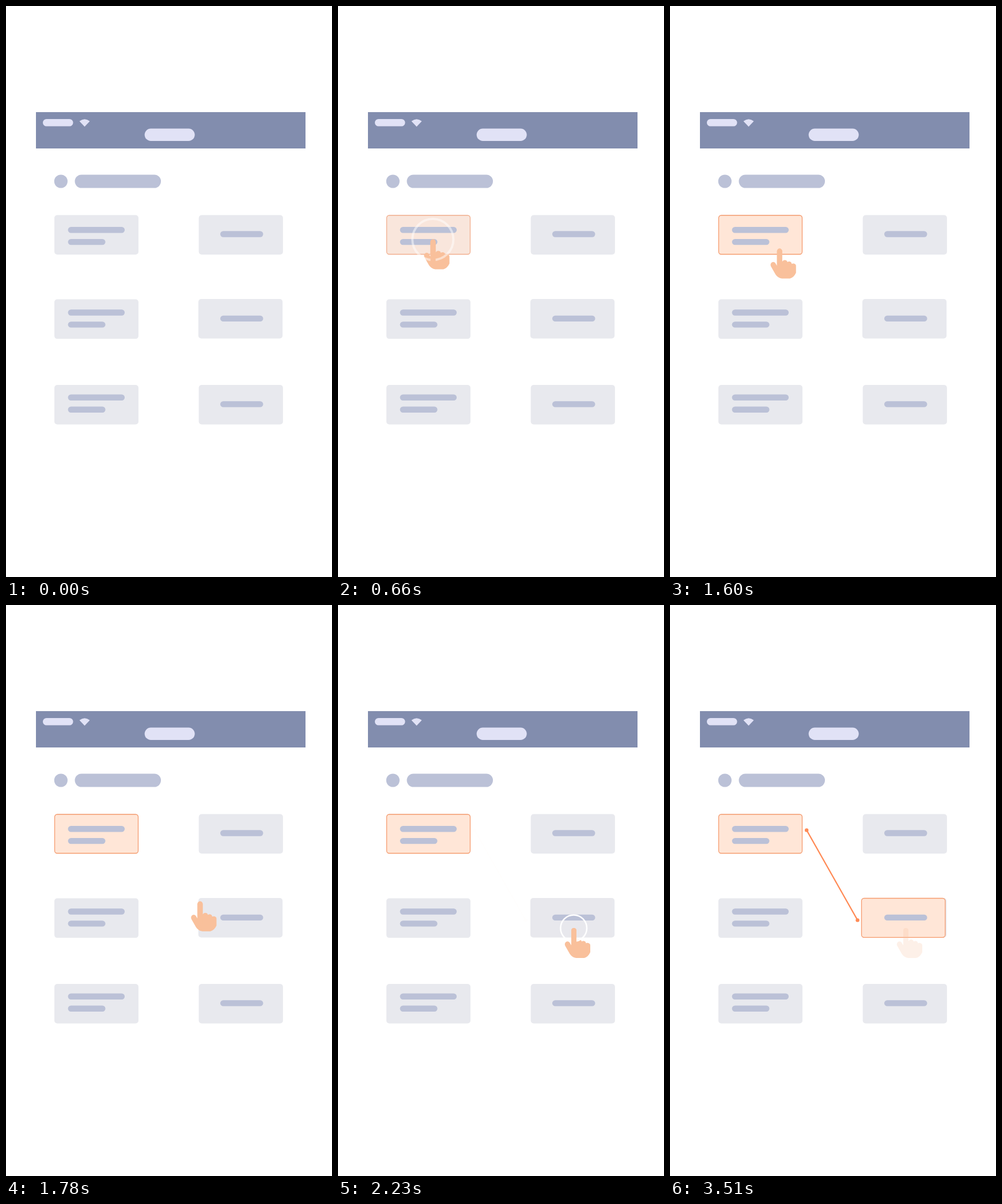
An HTML page that plays this animation: 566 px wide and 990 px high, repeating every 3.6 s.

```html
<!DOCTYPE html>
<html lang="en">
<head>
<meta charset="utf-8">
<title>Matching pairs</title>
<style>
  html, body { margin: 0; width: 100%; height: 100%; overflow: hidden; background: #fff; }
  svg { display: block; width: 566px; height: 990px; }
  .pill { fill: #e1e2f6; }
  .bar { fill: #bbc1d7; }
  .card { fill: #e8e9ee; }
  .chosen { fill: #ffe6d7; stroke: #f59b6e; stroke-width: 1.3; }
  .skin { fill: #f9c09b; }
</style>
</head>
<body>
<svg viewBox="0 0 566 990">
  <rect x="52" y="184" width="468" height="63" fill="#828dae"/>
  <rect class="pill" x="64" y="196" width="52.5" height="12.6" rx="6.3"/>
  <path class="pill" d="M136.5 209.3 127.5 199.8Q136.5 192.6 145.5 199.8Z"/>
  <rect class="pill" x="240.7" y="212.6" width="87" height="21.4" rx="10.7"/>
  <circle class="bar" cx="95.3" cy="304" r="11.6"/>
  <rect class="bar" x="119.5" y="292.5" width="149.5" height="23" rx="11.5"/>

  <g id="cards"></g>
  <rect id="first" class="chosen" x="84.5" y="363" width="145" height="67.5" rx="4.5"/>
  <rect id="second" class="chosen" x="332.5" y="508.5" width="145.3" height="67.8" rx="4.5"/>
  <g id="bars"></g>

  <g id="link" fill="#ff8a55" stroke="#ff8a55">
    <path d="M237.2 390.4 325.6 546.4" stroke-width="2.2"/>
    <g stroke="none">
      <circle cx="237.2" cy="390.4" r="3.2"/>
      <circle cx="325.6" cy="546.4" r="3.2"/>
    </g>
  </g>

  <!-- The origin of the hand is its fingertip. -->
  <g id="hand">
    <path class="skin" d="M-4.5 4.5A4.5 4.5 0 0 1 4.5 4.5V23Q6 20 9 20 13 20 13.5 23.5 15 22.3 17.3 22.5
      20.7 23 21 26.5 22.5 25.5 25 26 28.5 27 28.5 30V42Q25 50 18 52H4Q-3 51-7 45L-15 31Q-17 27-13.5 24
      -10 22-7.5 25L-4.5 30Z"/>
    <circle id="ring" cx="-.3" cy=".2" fill="none" stroke="#fff"/>
    <rect class="skin" x="-4.5" width="9" height="42" rx="4.5"/>
  </g>
</svg>
<script>
  const LOOP = 3600;
  const get = id => document.getElementById(id);
  const [cards, bars, first, second, link, hand, ring] =
    ['cards', 'bars', 'first', 'second', 'link', 'hand', 'ring'].map(get);

  function addRect(parent, cls, x, y, width, height, rx) {
    const rect = document.createElementNS('http://www.w3.org/2000/svg', 'rect');
    const attrs = { class: cls, x, y, width, height, rx };
    for (const name in attrs) rect.setAttribute(name, attrs[name]);
    parent.append(rect);
  }
  const addBar = (x, y, width) => addRect(bars, 'bar', x, y, width, 10.4, 5.2);

  // Each row: card tops left and right, first text line left, text line right.
  [[362.5, 362.5, 383, 390.3], [508.6, 508, 526.3, 536.7], [657, 657, 673.6, 685.2]]
    .forEach(([left, right, leftText, rightText], row) => {
      addRect(cards, 'card', 84, left, 146, 68.5, 5);
      addRect(cards, 'card', row === 1 ? 334 : 334.7, right, 146.2, 68.5, 5);
      addBar(107.6, leftText, 98.5);
      addBar(107.6, leftText + 20.9, 65);
      addBar(372, rightText, 74.5);
    });

  const ramp = (t, from, to) => Math.min(1, Math.max(0, (t - from) / (to - from)));
  const mix = (a, b, p) => a + (b - a) * p;

  function drawRing(t) {
    const [start, fadeStart] = t < 1500 ? [510, 900] : [1930, 2230];
    const close = ramp(t, start, start + 300);
    const scale = mix(2.13, 1, close);
    ring.setAttribute('r', 22.8 * scale);
    ring.setAttribute('stroke-width', 2.5 * scale);
    ring.setAttribute('opacity', close * (1 - ramp(t, fadeStart, fadeStart + 300)));
  }

  function drawHand(t) {
    const enter = ramp(t, 90, 390), travel = ramp(t, 1570, 1870);
    const x = mix(mix(227, 165, enter), 409.5, travel);
    const y = mix(mix(346.5, 404.5, enter), 560, travel);
    const leave = ramp(Math.min(t, 3510), 3200, 3600);
    hand.setAttribute('transform', `translate(${x} ${y})`);
    hand.setAttribute('opacity', t < 120 ? 0 : enter * (1 - leave));
  }

  function draw(now) {
    const t = now % LOOP;
    first.setAttribute('opacity', ramp(t, 510, 710));
    second.setAttribute('opacity', ramp(t, 2230, 2530));
    link.setAttribute('opacity', ramp(t, 2230, 2530));
    drawHand(t);
    drawRing(t);
  }

  const begin = performance.now();
  function tick() {
    draw(performance.now() - begin);
    requestAnimationFrame(tick);
  }
  tick();
</script>
</body>
</html>
```
